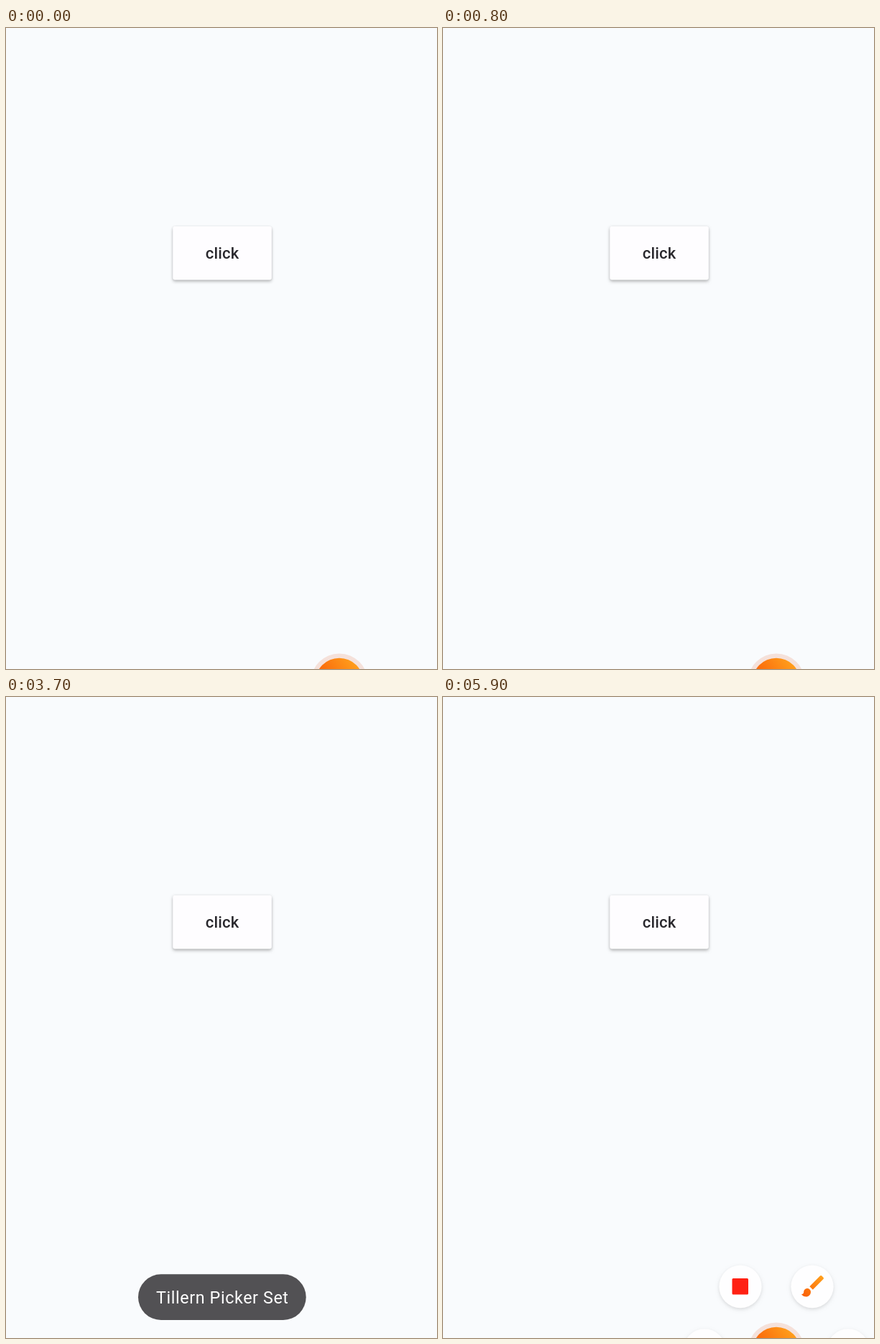
Recreate the animation shown at these times as an HTML page with a canvas. Size 600x892 px, loop 6000 ms.

```html
<!DOCTYPE html>
<html lang="en">
<head>
<meta charset="utf-8">
<style>
  html, body { margin: 0; width: 100%; height: 100%; overflow: hidden; background: #f9fbfd; }
  canvas { display: block; }
</style>
</head>
<body>
<canvas id="stage" width="600" height="892"></canvas>
<script>
const ctx = document.getElementById('stage').getContext('2d');
const LOOP = 6000;
const STEP = 100;
const BRUSH = new Path2D('M7 14c-1.66 0-3 1.34-3 3 0 1.31-1.16 2-2 2 .92 1.22 2.49 2 4 2 2.21 0 4-1.79 4-4 0-1.66-1.34-3-3-3z' +
  'm13.71-9.37l-1.34-1.34a1 1 0 0 0-1.41 0L9 12.25 11.75 15l8.96-8.96a1 1 0 0 0 0-1.41z');

// Times at which the finger is fully down; the toast follows one step later.
const TAPS = [200, 3400];

const clamp = v => Math.max(0, Math.min(1, v));
const between = (t, from, to) => t >= from && t < to;

function shadow(color, blur, dy) {
  ctx.shadowColor = color;
  ctx.shadowBlur = blur;
  ctx.shadowOffsetY = dy;
}

function roundRect(x, y, w, h, r, fill) {
  ctx.beginPath();
  ctx.roundRect(x, y, w, h, r);
  ctx.fillStyle = fill;
  ctx.fill();
}

function disc(x, y, r, fill) {
  ctx.beginPath();
  ctx.arc(x, y, r, 0, Math.PI * 2);
  ctx.fillStyle = fill;
  ctx.fill();
}

function label(text, y, font, spacing, color) {
  ctx.font = font;
  ctx.letterSpacing = spacing + 'px';
  ctx.textAlign = 'center';
  ctx.fillStyle = color;
  ctx.fillText(text, 301 + spacing / 2, y);
}

function orange(x0, y0, x1, y1) {
  const g = ctx.createLinearGradient(x0, y0, x1, y1);
  g.addColorStop(0, '#ff9f1c');
  g.addColorStop(1, '#fa6209');
  return g;
}

function drawButton(press, lift) {
  const scale = 1 - 0.1 * press;
  const face = press > 0 ? '#f8f6fa' : '#fefdff';
  ctx.save();
  ctx.translate(301, 313.3);
  ctx.scale(scale, scale);
  ctx.translate(-301, -313.3);
  shadow('rgba(0,0,0,0.12)', 3, 0.5);
  roundRect(232.3, 276, 137.5, 74.5, 3, face);
  shadow('rgba(0,0,0,0.24)', 4 + 2 * lift, 2.5 + lift);
  roundRect(232.3, 276, 137.5, 74.5, 3, face);
  shadow('transparent', 0, 0);
  label('click', 321, '500 22px Roboto, sans-serif', 0.2, '#29282d');
  ctx.restore();

  if (press === 1) {
    const ink = ctx.createRadialGradient(335.5, 319, 1, 335.5, 319, 7);
    ink.addColorStop(0, 'rgba(80,78,84,0.2)');
    ink.addColorStop(1, 'rgba(80,78,84,0)');
    disc(335.5, 319, 7, ink);
  }
}

function drawToast(alpha) {
  ctx.save();
  ctx.globalAlpha = alpha;
  roundRect(184, 803.3, 233.7, 63.7, 31.85, '#525154');
  label('Tillern Picker Set', 844, '400 23.3px Roboto, sans-serif', 0.6, '#fff');
  ctx.restore();
}

function drawBubble(alpha) {
  ctx.save();
  ctx.globalAlpha = alpha;
  disc(464, 910, 39.5, '#f5e1da');
  disc(464, 910.3, 33.5, orange(482, 877, 440, 908));
  ctx.restore();
}

function drawMenu() {
  shadow('rgba(0,0,0,0.13)', 5, 2);
  for (const [x, y] of [[364, 909], [564, 909], [414, 820.5], [514, 820.5]]) {
    disc(x, y, 29.7, '#fefeff');
  }
  shadow('transparent', 0, 0);
  roundRect(402.5, 809, 22.5, 22.5, 1.5, '#ff2114');
  ctx.save();
  ctx.translate(495.7, 800.2);
  ctx.scale(1.63, 1.63);
  ctx.fillStyle = orange(20, 4, 4, 20);
  ctx.fill(BRUSH);
  ctx.restore();
}

function bubbleAlpha(t) {
  if (t >= 5600) return 1;
  return clamp((1700 - t) / 400);
}

function draw(t) {
  ctx.fillStyle = '#f9fbfd';
  ctx.fillRect(0, 0, 600, 892);

  let press = 0, lift = 0, toast = 0;
  for (const tap of TAPS) {
    const since = t - tap;
    if (between(since, 0, 100)) press = lift = 1;
    else if (between(since, 100, 300)) lift = 0.3;
    if (between(since, 100, 600)) toast = clamp((600 - since) / 200);
  }
  if (between(t, 100, 200)) press = lift = 0.5;

  drawButton(press, lift);
  if (toast) drawToast(toast);
  if (t >= 5900) drawMenu();
  const alpha = bubbleAlpha(t);
  if (alpha) drawBubble(alpha);
}

function tick() {
  const t = performance.now() % LOOP;
  draw(Math.floor(t / STEP) * STEP);
  requestAnimationFrame(tick);
}
tick();
</script>
</body>
</html>
```
